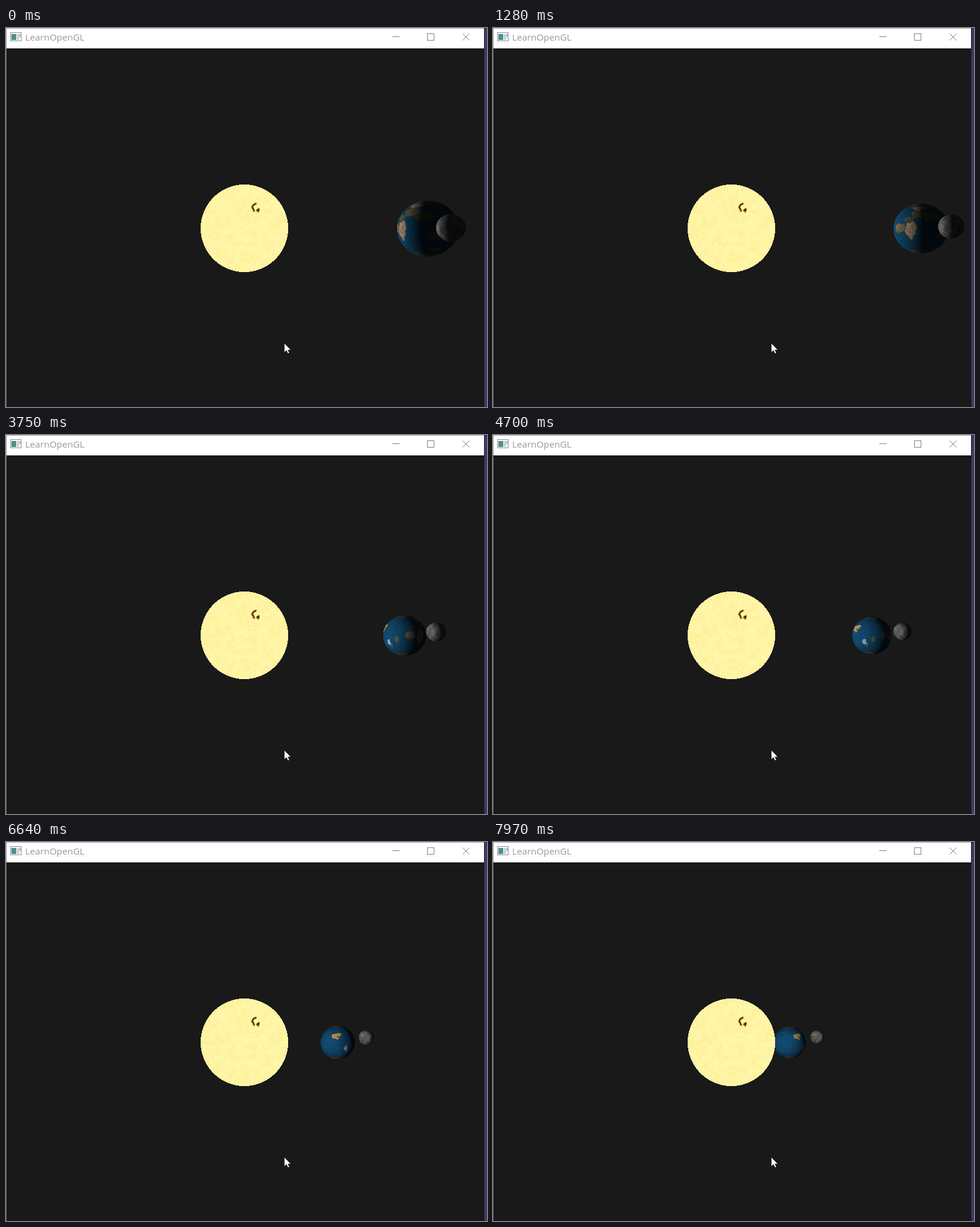
An HTML page with a canvas for the animation above (8 s loop, 803x632 px).

```html
<!DOCTYPE html>
<html lang="en">
<head>
<meta charset="utf-8">
<title>LearnOpenGL</title>
<style>
  html, body { margin: 0; width: 100%; height: 100%; overflow: hidden; background: #191919; }
  canvas { display: block; position: absolute; left: 0; top: 0; }
  svg { position: absolute; left: 0; top: 0; }
  .title { font: 15.3px "Open Sans", "Noto Sans", sans-serif; fill: #999; }
</style>
</head>
<body>
<canvas id="stage" width="803" height="632"></canvas>
<svg width="803" height="632" viewBox="0 0 803 632">
  <g shape-rendering="crispEdges">
    <path fill="#fff" d="M0 0h798v34H0z"/>
    <path fill="#a2a2a2" d="M0 0h798v1H0zM0 1h1v33H0z"/>
    <path fill="#686868" d="M0 34h1v598H0z"/>
    <path fill="#40376a" d="M798 0h5v632h-5z"/>
    <path fill="#292442" d="M798 0h1v632h-1zM798 0h5v1h-5z"/>
    <path fill="#8c9292" d="M7 7h19v15H7z"/>
    <path fill="#f7f9f9" d="M8 8h17v13H8z"/>
    <path fill="#4e8f8c" d="M9 10h8v10H9z"/>
    <path fill="#c5d5d5" d="M18 10h4v10h-4z"/>
    <path fill="#667" d="M23 10h1v5h-1z"/>
    <path fill="#808080" d="M645 14h12v1h-12z"/>
    <path fill="none" stroke="#808080" d="M703.5 9.5h11v11h-11z"/>
  </g>
  <path fill="none" stroke="#808080" d="M762.3 9.3l11.4 11.4M773.7 9.3l-11.4 11.4"/>
  <text class="title" x="32" y="21">LearnOpenGL</text>
  <path fill="#fff" stroke="#111" stroke-width=".7" d="M464.6 525.5v15.6l3.5-3.3 2.6 5.2 2.5-1.2-2.5-4.9h4.9z"/>
</svg>
<script>
const DURATION = 8000;
const DEG = Math.PI / 180;
const SUN = { x: 398, y: 334, r: 73 };
const ctx = document.getElementById('stage').getContext('2d');

// Land patches: longitude, latitude, half width, half height (degrees), colour
const OCEAN = [19, 78, 117];
const TAN = [186, 157, 124], GREEN = [92, 100, 62], BROWN = [128, 108, 76];
const ORANGE = [205, 158, 88], ICE = [160, 180, 190], HAZE = [120, 112, 112];
const LAND = [
  [-198, 22, 13, 11, ORANGE],
  [-182, 27, 13, 9, ORANGE],
  [-187, 14, 6, 5, ORANGE],
  [-155, -20, 8, 11, ICE],
  [-149, -30, 4, 7, HAZE],
  [-127, -12, 8, 11, GREEN],
  [-58, -4, 15, 24, TAN],
  [-85, 3, 20, 11, BROWN],
  [-92, -4, 12, 7, GREEN],
  [-66, 22, 14, 9, GREEN],
  [-38, 36, 27, 13, BROWN],
  [-42, 55, 34, 8, TAN],
  [-8, 27, 24, 13, GREEN],
  [15, -14, 17, 11, HAZE],
  [34, -9, 12, 8, HAZE],
  [22, -50, 20, 7, HAZE]
];

const clamp = v => Math.max(0, Math.min(1, v));

function hash(x, y) {
  let h = Math.imul(x, 374761393) ^ Math.imul(y, 668265263);
  h = Math.imul(h ^ (h >>> 13), 1274126177);
  return ((h ^ (h >>> 16)) >>> 0) / 4294967296;
}

function noise(x, y) {
  const ix = Math.floor(x), iy = Math.floor(y);
  let fx = x - ix, fy = y - iy;
  fx *= fx * (3 - 2 * fx);
  fy *= fy * (3 - 2 * fy);
  const top = hash(ix, iy) * (1 - fx) + hash(ix + 1, iy) * fx;
  const low = hash(ix, iy + 1) * (1 - fx) + hash(ix + 1, iy + 1) * fx;
  return top * (1 - fy) + low * fy;
}

// wrap an angle to -180..180
const wrap = a => ((a + 180) % 360 + 360) % 360 - 180;

function earthColor(lon, lat) {
  const l = wrap(lon);
  const rough = noise(l / 6, lat / 6), fine = noise(l / 2.5 + 90, lat / 2.5);
  const tone = 0.82 + 0.36 * fine;
  let color = OCEAN, cover = 0;
  for (const [x, y, w, h, c] of LAND) {
    const dx = wrap(l - x) / w, dy = (lat - y) / h;
    const k = clamp((1.25 - dx * dx - dy * dy - 0.75 * rough) * 3);
    if (k > cover) { cover = k; color = c; }
  }
  const pole = clamp((Math.abs(lat) - 63 + 8 * rough) / 8) * 0.8;
  if (pole > cover) { cover = pole; color = BROWN; }
  return OCEAN.map((o, i) => o * (0.92 + 0.16 * rough) * (1 - cover) + color[i] * tone * cover);
}

function moonColor(lon, lat) {
  const g = 50 + 72 * noise(lon / 20 + 40, lat / 20) + 24 * noise(lon / 7, lat / 7 + 30);
  return [g, g, g];
}

const buffer = document.createElement('canvas');
buffer.width = buffer.height = 150;
const pen = buffer.getContext('2d');

// Shaded sphere; sunAngle is measured between the viewer and the light
function drawBall(cx, cy, rx, ry, sunAngle, spin, colorAt) {
  const left = Math.floor(cx - rx), top = Math.floor(cy - ry);
  const w = Math.ceil(rx * 2) + 2, h = Math.ceil(ry * 2) + 2;
  const img = pen.createImageData(w, h);
  const lx = -Math.sin(sunAngle), lz = Math.cos(sunAngle);
  for (let j = 0; j < h; j++) {
    for (let i = 0; i < w; i++) {
      const u = (left + i + 0.5 - cx) / rx, v = (top + j + 0.5 - cy) / ry;
      const d = u * u + v * v;
      if (d > 1) continue;
      const z = Math.sqrt(1 - d);
      const light = 0.1 + 0.86 * Math.pow(Math.max(0, u * lx + z * lz), 0.8);
      const rgb = colorAt(Math.atan2(u, z) / DEG - spin, -Math.asin(v) / DEG);
      const p = (j * w + i) * 4;
      for (let k = 0; k < 3; k++) img.data[p + k] = rgb[k] * light;
      img.data[p + 3] = 255;
    }
  }
  pen.clearRect(0, 0, 150, 150);
  pen.putImageData(img, 0, 0);
  ctx.drawImage(buffer, left, top);
}

function makeSun() {
  const c = document.createElement('canvas');
  c.width = c.height = SUN.r * 2;
  const g = c.getContext('2d');
  const img = g.createImageData(c.width, c.height);
  for (let y = 0; y < c.height; y++) {
    for (let x = 0; x < c.width; x++) {
      if (Math.hypot(x + 0.5 - SUN.r, y + 0.5 - SUN.r) > SUN.r) continue;
      const n = noise(x / 3, y / 3) * 0.6 + noise(x / 9 + 50, y / 9) * 0.4 - 0.5;
      img.data.set([254, 244 + n * 14, 164 + n * 30, 255], (y * c.width + x) * 4);
    }
  }
  g.putImageData(img, 0, 0);
  g.translate(SUN.r - SUN.x, SUN.r - SUN.y);
  const mark = (color, width, path) => {
    g.strokeStyle = color;
    g.lineWidth = width;
    g.lineCap = g.lineJoin = 'round';
    g.stroke(new Path2D(path));
  };
  const spots = 'M417 293l-4 2-2 4 2 3 1 3M419 304l3-2M421 306l1-3';
  mark('rgba(226,177,80,.55)', 5, spots);
  mark('#4a2b08', 2.3, spots);
  mark('#fffbe0', 1.5, 'M416 299l1 4');
  return c;
}

const sun = makeSun();

function draw(ms) {
  const t = ms / 1000;
  const orbit = (53.75 + 12.5 * t) * DEG;
  const ry = 1 / (0.02793 - 0.01092 * Math.cos(orbit));
  const dx = 8.15 * Math.sin(orbit) * ry;
  const stretch = 1 + 0.11 * (dx / 318) ** 2;
  const sunAngle = Math.PI - orbit - Math.atan(dx / 746);
  const x = SUN.x + dx;

  ctx.fillStyle = '#191919';
  ctx.fillRect(0, 0, 803, 632);
  drawBall(x, 334.3, ry * stretch, ry, sunAngle, 28 * t, earthColor);

  const moonX = x + ry * (1.78 - 0.95 * Math.exp(-t / 2.4));
  const moonY = 334 - ry * (0.02 + 0.04 * t);
  const moonR = ry * (0.485 - 0.0009 * t * t);
  drawBall(moonX, moonY, moonR * stretch, moonR, sunAngle, 12 * t, moonColor);

  ctx.drawImage(sun, SUN.x - SUN.r, SUN.y - SUN.r);
}

function tick() {
  draw(performance.now() % DURATION);
  requestAnimationFrame(tick);
}
tick();
</script>
</body>
</html>
```
